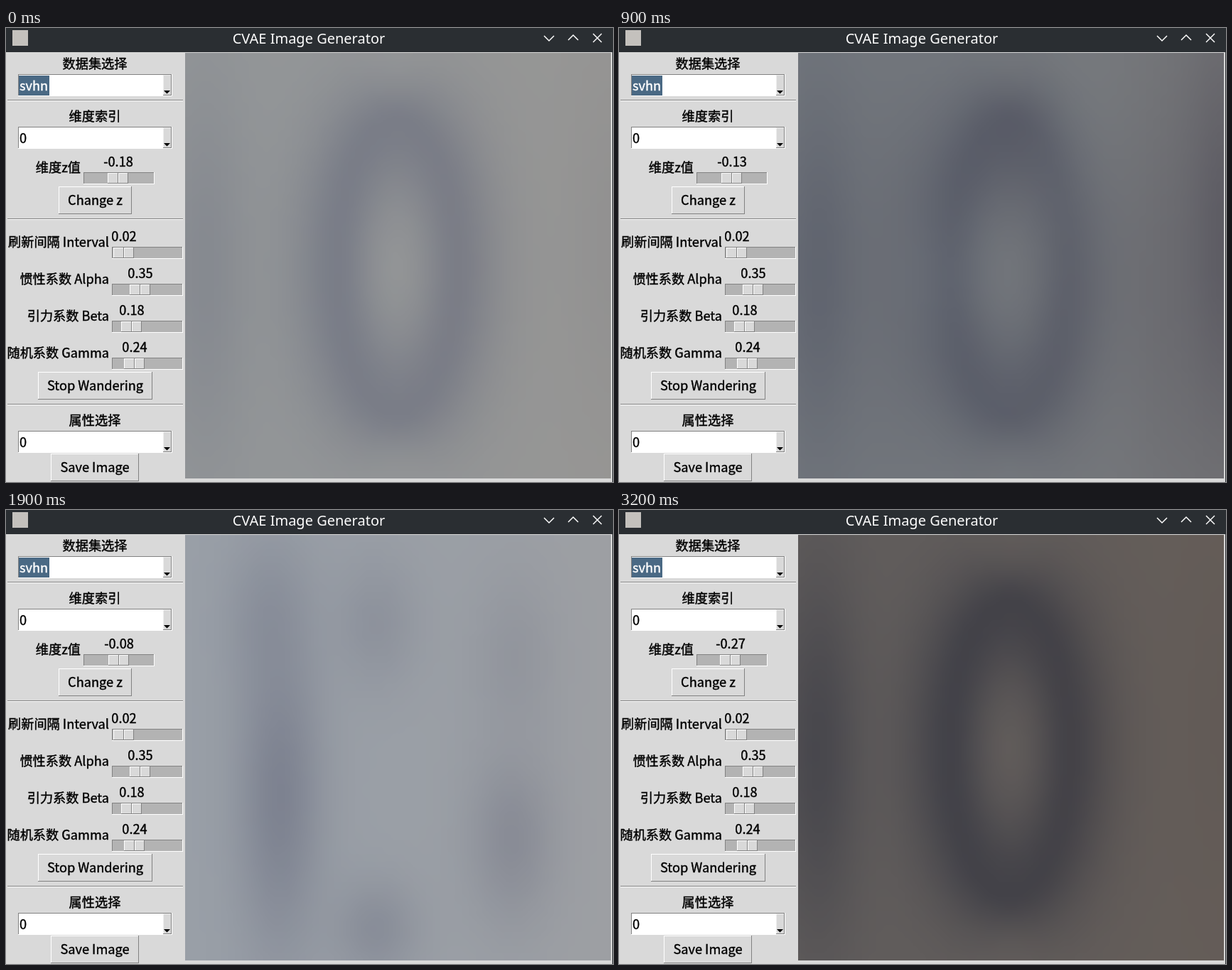
Animation of 854 by 639 pixels, one loop 3.3 s. Source, as an HTML page with a canvas:

```html
<!DOCTYPE html>
<html lang="zh">
<head>
<meta charset="utf-8">
<title>CVAE Image Generator</title>
<style>
html, body { margin: 0; width: 100%; height: 100%; overflow: hidden; background: #d9d9d9; }
canvas { display: block; }
</style>
</head>
<body>
<canvas id="stage" width="854" height="639"></canvas>
<script>
const ctx = document.getElementById('stage').getContext('2d');
const LOOP = 3300, N = 60, VIEW = { x: 252, y: 35, w: 599, h: 599 };
const UI_FONT = '500 18.2px "Noto Sans CJK SC", "Noto Sans CJK", "Noto Sans", sans-serif';
const FACE = '#d9d9d9', DARK = '#828282', BAR = '#2a2e32';

const mix = (a, b, k) => a + (b - a) * k;
const bell = d => Math.exp(-d * d);

// How strongly the blurred zero covers a point: thin outside, fading into the hole.
function zero(x, y) {
  const rx = 85, ry = 204, dx = x - 550, dy = y - 336;
  const e = Math.hypot(dx / rx, dy / ry);
  const d = e < 1 ? (1 - e) * rx
    : (e * e - 1) / (2 * Math.hypot(dx / rx ** 2, dy / ry ** 2));
  return bell(d / 50);
}

// A blurred picture: paper, ink, vertical strokes [x, y, half height, strength].
// A negative strength lightens the paper.
function paint(paper, ink, strokes, hasZero) {
  const out = [];
  for (let i = 0; i < N * N; i++) {
    const u = (i % N + 0.5) / N, v = (Math.floor(i / N) + 0.5) / N;
    const x = VIEW.x + u * VIEW.w, y = VIEW.y + v * VIEW.h;
    let k = 0;
    for (const [sx, sy, h, strength] of strokes)
      k = mix(k, strength, bell((x - sx) / 60) * bell((y - sy) / h));
    if (hasZero) k = mix(k, 1, zero(x, y));
    const warm = 4 * u * u;
    paper.forEach((p, j) => out.push(mix(p, ink[j], k) + warm * (1 - j)));
  }
  return out;
}
const zeroPicture = (paper, ink, left, right) =>
  paint(paper, ink, [[280, 340, 260, left], [851, 300, 260, right]], true);

const keys = [
  { t: 0, z: -0.18, pic: zeroPicture([147, 150, 152], [121, 125, 136], 0.5, 0.2) },
  { t: 600, z: 0.21, pic: zeroPicture([141, 145, 147], [92, 95, 109], 0.75, 0.65) },
  { t: 1200, z: 0.73, pic: paint([89, 94, 104], [70, 72, 85], [
    [385, 350, 250, 0.6], [560, 220, 150, 0.5], [460, 345, 95, -0.5],
    [645, 200, 200, -0.5], [770, 380, 300, 0.9], [851, 300, 400, 1]]) },
  { t: 1600, z: 0.34, pic: paint([82, 85, 97], [70, 72, 86], [
    [300, 320, 100, 0.6], [480, 610, 70, 0.8],
    [400, 340, 235, -1.5], [590, 370, 190, -1.5], [490, 270, 130, -0.9]]) },
  { t: 1900, z: -0.08, pic: paint([153, 159, 167], [122, 127, 142], [
    [370, 150, 110, 0.45], [385, 400, 220, 0.9], [520, 160, 90, 0.4],
    [520, 590, 70, 0.55], [712, 460, 120, 0.6], [715, 210, 120, 0.3]]) },
  { t: 2400, z: 0.46, pic: zeroPicture([125, 128, 132], [92, 96, 109], 0.9, 0.5) },
  { t: 3200, z: -0.27, pic: zeroPicture([97, 93, 92], [66, 66, 73], 0.8, 0.1) }
];

function rect(x, y, w, h, color) {
  ctx.fillStyle = color;
  ctx.fillRect(x, y, w, h);
}
function bevel(x, y, w, h, fill, light, dark) {
  rect(x, y, w, h, dark);
  rect(x, y, w - 1, h - 1, light);
  rect(x + 1, y + 1, w - 2, h - 2, fill);
}
function text(s, x, y, align = 'center', color = '#000') {
  ctx.font = UI_FONT;
  ctx.textAlign = align;
  ctx.fillStyle = ctx.strokeStyle = color;
  ctx.lineWidth = 0.4;
  ctx.fillText(s, x, y);
  ctx.strokeText(s, x, y);
}
function line(...points) {
  ctx.strokeStyle = '#fcfcfc';
  ctx.lineWidth = 1.5;
  ctx.beginPath();
  points.forEach(p => ctx.lineTo(...p));
  ctx.stroke();
}
function separator(y) {
  rect(2, y, 247, 1, DARK);
  rect(2, y + 1, 247, 1, '#fff');
}
function combo(y, value, selected) {
  bevel(17, y - 1, 217, 31, '#fff', DARK, '#fff');
  if (selected) rect(18, y + 1, 43, 28, '#4a6984');
  text(value, 19, y + 22, 'left', selected ? '#fff' : '#000');
  bevel(221, y, 12, 29, FACE, '#eee', DARK);
  ctx.fillStyle = '#000';
  ctx.beginPath();
  ctx.moveTo(222, y + 22);
  ctx.lineTo(231, y + 22);
  ctx.lineTo(226.5, y + 26.5);
  ctx.fill();
}
function button(x, y, w, label) {
  bevel(x, y, w, 39, FACE, '#fff', DARK);
  text(label, x + w / 2, y + 26);
}
function slider(label, x, y, value, share) {
  const knob = Math.round(x + 0.6 + 70 * share);
  text(label, x - 4, y, 'right');
  bevel(x, y, 100, 17, '#b3b3b3', DARK, '#fff');
  bevel(knob, y + 1, 15, 15, FACE, '#fff', DARK);
  bevel(knob + 15, y + 1, 14, 15, FACE, '#fff', DARK);
  text(value.toFixed(2), knob + 15, y - 8);
}

function drawTitleBar() {
  rect(0, 0, 854, 34, BAR);
  rect(853, 34, 1, 605, BAR);
  rect(9, 3, 22, 22, '#c4c1bd');
  ctx.font = '20px "Noto Sans", sans-serif';
  ctx.textAlign = 'center';
  ctx.fillStyle = '#fcfcfc';
  ctx.fillText('CVAE Image Generator', 426, 22);
  line([757, 11], [764, 18], [771, 11]);
  line([791, 17], [798, 10], [805, 17]);
  line([826, 8], [838, 20]);
  line([838, 8], [826, 20]);
}

function drawPanel(z) {
  text('数据集选择', 125, 57);
  combo(66, 'svhn', true);
  separator(101);
  text('维度索引', 125, 131);
  combo(140, '0');
  slider('维度z值', 109, 203, z, 0.506 + z / 6.5);
  button(74, 223, 103, 'Change z');
  separator(268);
  Object.entries({
    '刷新间隔 Interval': 0.02, '惯性系数 Alpha': 0.35,
    '引力系数 Beta': 0.18, '随机系数 Gamma': 0.24
  }).forEach(([label, v], i) => slider(label, 149, 308 + 52 * i, v, v));
  button(45, 484, 161, 'Stop Wandering');
  separator(529);
  text('属性选择', 125, 559);
  combo(568, '0');
  button(63, 599, 124, 'Save Image');
}

const small = document.createElement('canvas');
small.width = small.height = N;
const smallCtx = small.getContext('2d');
const pixels = smallCtx.createImageData(N, N);

function drawPicture(a, b, k) {
  for (let i = 0; i < N * N; i++) {
    for (let j = 0; j < 3; j++) pixels.data[i * 4 + j] = mix(a[i * 3 + j], b[i * 3 + j], k);
    pixels.data[i * 4 + 3] = 255;
  }
  smallCtx.putImageData(pixels, 0, 0);
  ctx.imageSmoothingQuality = 'high';
  ctx.drawImage(small, VIEW.x, VIEW.y, VIEW.w, VIEW.h);
}

const start = performance.now();
function frame(now) {
  const t = Math.max(0, now - start) % LOOP;
  const step = t < 2600 ? 100 : 200;
  const held = Math.floor(t / step) * step;
  const next = Math.max(1, keys.findIndex(key => key.t >= held));
  const a = keys[next - 1], b = keys[next];
  const k = (held - a.t) / (b.t - a.t);
  rect(0, 0, 854, 639, FACE);
  drawTitleBar();
  // z dips below zero on its way between two keys
  drawPanel(mix(a.z, b.z, k) - 0.6 * Math.sin(Math.PI * k));
  drawPicture(a.pic, b.pic, k);
  requestAnimationFrame(frame);
}
requestAnimationFrame(frame);
</script>
</body>
</html>
```
